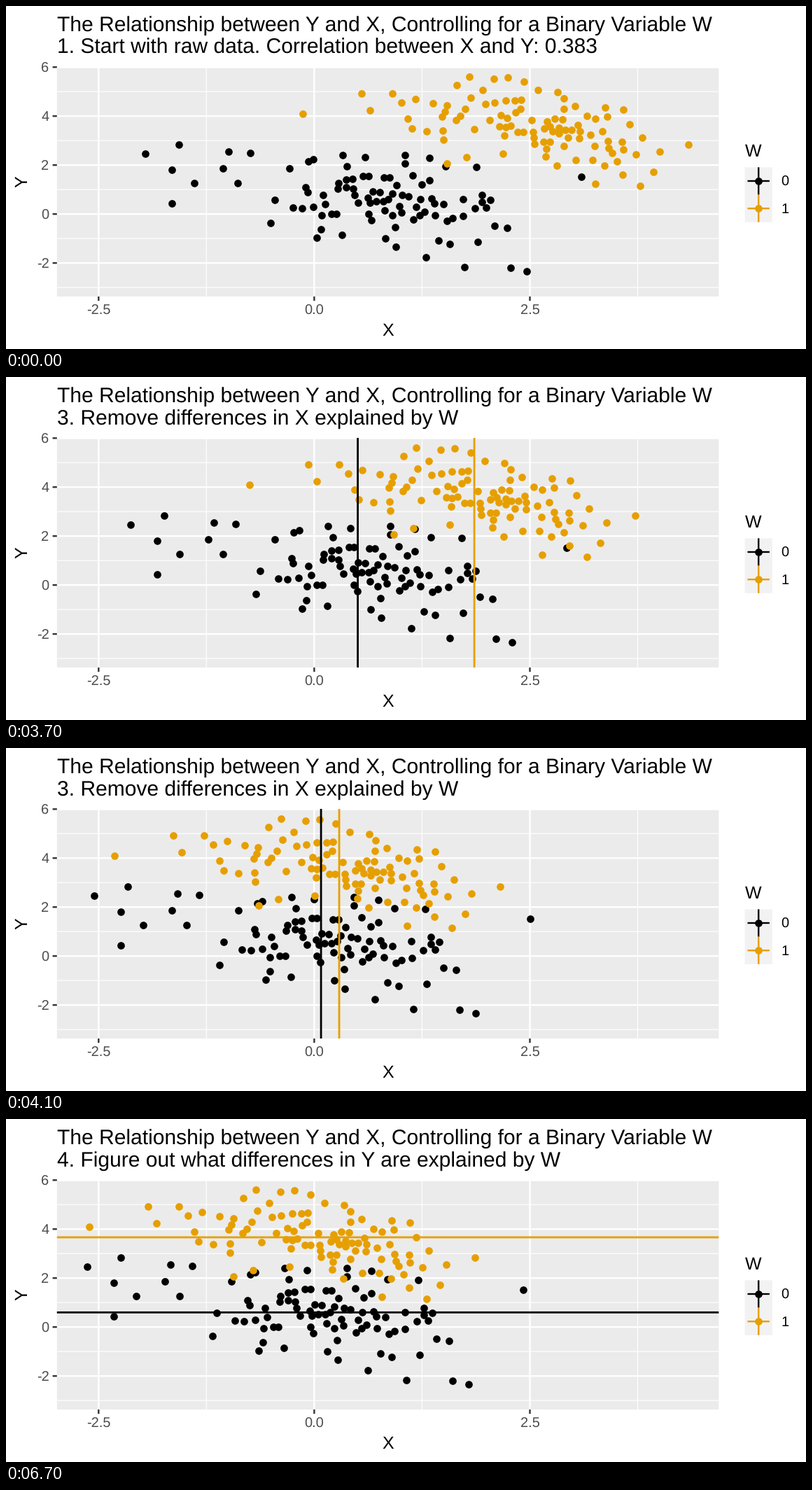
Write a matplotlib script that moves like this. It is 1143x490 px and loops after 8 s.

```python
import math

import matplotlib.pyplot as plt
import numpy as np
from matplotlib.animation import FuncAnimation
from matplotlib.patches import Rectangle

W, H, DPI = 1143, 490, 64
PT = 72 / DPI  # points per pixel
STEP = 100  # ms per frame
FRAMES = 80

BLACK, ORANGE = "#000000", "#E69F00"
LEFT, RIGHT, TOP, BOTTOM = 72.8, 1018.3, 87, 415
X0, X_UNIT = 440.4, 123.24
Y0, Y_UNIT = 297.2, 34.98
X_MEANS = (523.3, 745.3)
Y_MEANS = (276.3, 169.0)
DOT = 10.7
RULE = 2.8

HEADING = "The Relationship between Y and X, Controlling for a Binary Variable W"
STAGES = [
    (0, "1. Start with raw data. Correlation between X and Y: 0.383"),
    (500, "2. Figure out what differences in X are explained by W"),
    (3500, "3. Remove differences in X explained by W"),
    (6400, "4. Figure out what differences in Y are explained by W"),
]
MOVE_START, MOVE_TIME = 3400, 900
V_LINES = (800, 6400)
H_LINES = 6700

# Outlying points of each group, in pixels; the core is sampled.
EDGE_0 = [
    (199, 211), (247, 198), (237, 234), (237, 282), (269, 253), (310, 232),
    (318, 208), (349, 210), (331, 253), (378, 310), (432, 222), (481, 213),
    (513, 216), (570, 213), (605, 217), (444, 331), (480, 327), (542, 332),
    (557, 344), (600, 359), (618, 335), (634, 340), (655, 373), (674, 337),
    (721, 374), (744, 379), (822, 244), (692, 277), (698, 314), (716, 317),
    (672, 230), (384, 277), (405, 232), (423, 289), (450, 319), (628, 229),
]
EDGE_1 = [
    (424, 154), (508, 125), (520, 149), (552, 125), (565, 138), (574, 161),
    (580, 175), (585, 133), (601, 179), (625, 191), (630, 225), (644, 113),
    (662, 101), (697, 104), (717, 102), (740, 108), (658, 216), (710, 211),
    (760, 120), (788, 123), (797, 132), (771, 215), (787, 228), (856, 145),
    (882, 148), (891, 169), (909, 188), (934, 208), (975, 198), (925, 237),
    (906, 257), (881, 241), (842, 254), (838, 220), (873, 222), (900, 212),
]

plt.rcParams.update({
    "font.family": "Liberation Sans",
    "text.hinting": "no_hinting",
    "path.snap": False,
})


def cloud(edge, count, mean, sd, slope, x_range, spread, seed):
    """Add a sampled core to the edge points, keeping the dots apart."""
    rng = np.random.default_rng(seed)
    pts = list(edge)
    while len(pts) < len(edge) + count:
        x = rng.normal(mean[0], sd[0])
        dy = rng.normal(0, sd[1])
        y = mean[1] + slope * (x - mean[0]) + dy
        inside = x_range[0] < x < x_range[1] and abs(dy) < spread
        if inside and all(math.hypot(x - a, y - b) > 7 for a, b in pts):
            pts.append((x, y))
    return np.array(pts, float)


def ease(p):
    p = min(max(p, 0), 1)
    return (1 - math.cos(math.pi * p)) / 2


fig = plt.figure(figsize=(W / DPI, H / DPI), dpi=DPI, facecolor="white")
ax = fig.add_axes([0, 0, 1, 1])
ax.set_xlim(0, W)
ax.set_ylim(H, 0)
ax.axis("off")


def box(x, y, w, h, color):
    ax.add_patch(Rectangle((x, y), w, h, fc=color, ec="none", zorder=0))


def line(xs, ys, color, width, z=1):
    return ax.plot(xs, ys, color=color, lw=width * PT, zorder=z,
                   solid_capstyle="butt")[0]


def label(x, y, text, size, color="black", ha="left", angle=0):
    return ax.text(x, y, text, fontsize=size * PT, color=color, ha=ha,
                   va="baseline", rotation=angle, rotation_mode="anchor")


def dots(pts, color):
    return ax.scatter(pts[:, 0], pts[:, 1], s=(DOT * PT) ** 2, c=color,
                      linewidths=0, zorder=3)


def draw_panel():
    box(LEFT, TOP, RIGHT - LEFT, BOTTOM - TOP, "#EBEBEB")
    for v in (-1.25, 1.25, 3.75):
        line([X0 + v * X_UNIT] * 2, [TOP, BOTTOM], "white", 1.2)
    for v in (-3, -1, 1, 3, 5):
        line([LEFT, RIGHT], [Y0 - v * Y_UNIT] * 2, "white", 1.2)
    for v in (-2.5, 0, 2.5):
        x = X0 + v * X_UNIT
        line([x, x], [TOP, BOTTOM], "white", 2.4)
        line([x, x], [BOTTOM, BOTTOM + 6.2], "#333333", 2.4)
        label(x, 440.5, f"{v:.1f}", 20, "#4D4D4D", "center")
    for v in (-2, 0, 2, 4, 6):
        y = Y0 - v * Y_UNIT
        line([LEFT, RIGHT], [max(y, TOP + 0.6)] * 2, "white", 2.4)
        line([LEFT - 6.2, LEFT], [y, y], "#333333", 2.4)
        label(61.6, y + 7.2, str(v), 20, "#4D4D4D", "right")
    label(545.6, 471, "X", 25, ha="center")
    label(30.3, 251, "Y", 25, ha="center", angle=90)


def draw_legend():
    label(1055.6, 214.8, "W", 25)
    box(1055.6, 230.4, 39.2, 78.4, "#F2F2F2")
    for i, color in enumerate((BLACK, ORANGE)):
        top = 230.4 + 39.2 * i
        mid = top + 19.6
        line([1075.2] * 2, [top, top + 39.2], color, 2.4, 2)
        line([1059.5, 1090.9], [mid, mid], color, 2.4, 2)
        dots(np.array([(1075.2, mid)]), color)
        label(1107, mid + 7.2, str(i), 20)


draw_panel()
draw_legend()
label(LEFT, 35.3, HEADING, 30)
subtitle = label(LEFT, 67.5, "", 30)

groups = [
    cloud(EDGE_0, 62, (540, 270), (68, 28), 0.1, (386, 690), 48, 4),
    cloud(EDGE_1, 64, (752, 168), (82, 21), 0.22, (598, 905), 42, 11),
]
colors = (BLACK, ORANGE)
clouds = [dots(g, c) for g, c in zip(groups, colors)]
v_lines = [line([m, m], [TOP, BOTTOM], c, RULE, 4)
           for m, c in zip(X_MEANS, colors)]
h_lines = [line([LEFT, RIGHT], [m, m], c, RULE, 4)
           for m, c in zip(Y_MEANS, colors)]


def update(i):
    t = i * STEP
    subtitle.set_text([text for start, text in STAGES if t >= start][-1])
    k = ease((t - MOVE_START) / MOVE_TIME)
    for pts, mean, cloud_dots, v, h in zip(groups, X_MEANS, clouds,
                                           v_lines, h_lines):
        shift = k * (X0 - mean)
        cloud_dots.set_offsets(pts + (shift, 0))
        v.set_xdata([mean + shift] * 2)
        v.set_visible(V_LINES[0] <= t < V_LINES[1])
        h.set_visible(t >= H_LINES)
    return [subtitle, *clouds, *v_lines, *h_lines]


anim = FuncAnimation(fig, update, frames=FRAMES, interval=STEP,
                     repeat=True, repeat_delay=0, blit=False)
plt.show()
```
